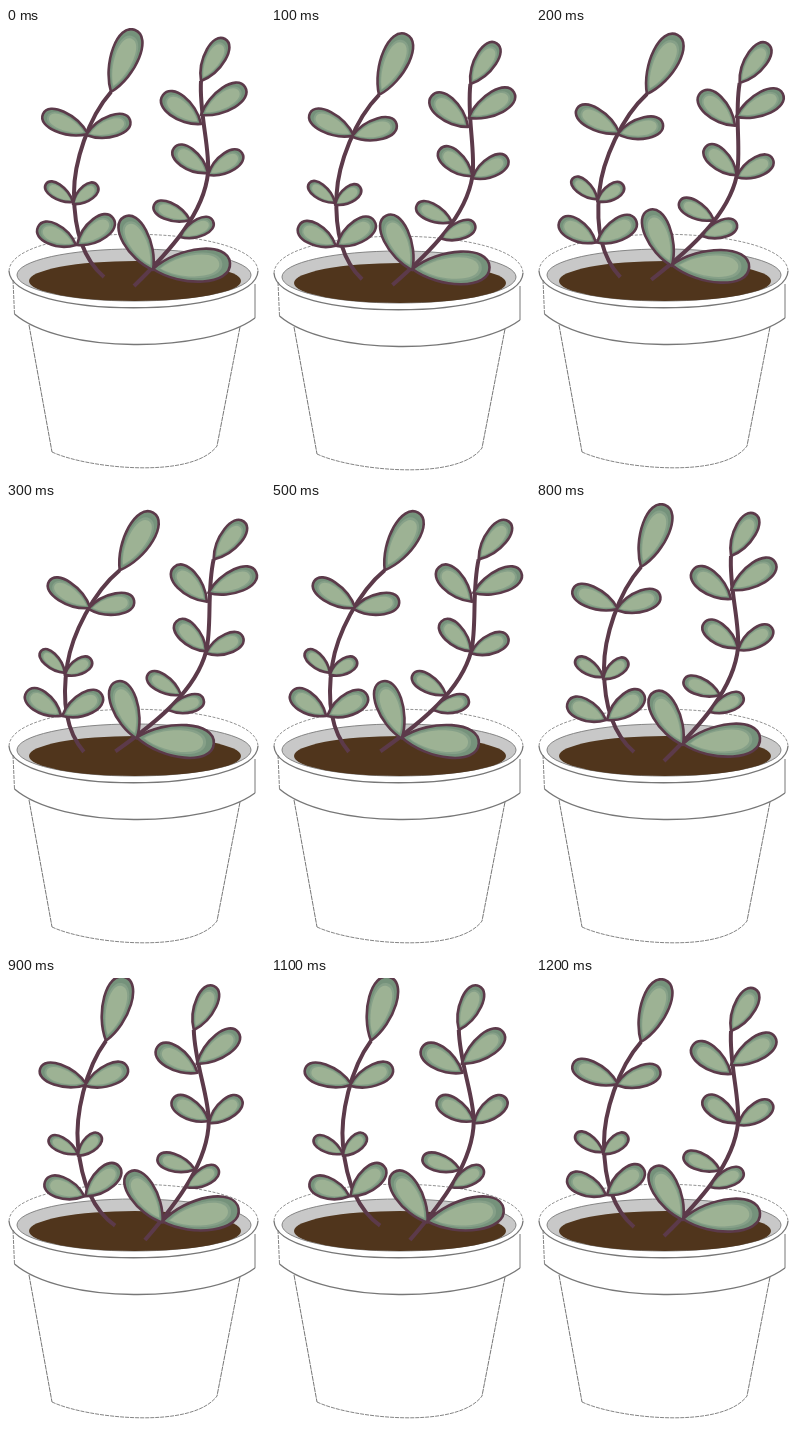
An HTML page with a canvas that plays this animation: 259 px wide and 447 px high, repeating every 1.4 s.

```html
<!DOCTYPE html>
<html lang="en">
<head>
<meta charset="utf-8">
<title>Swaying plant</title>
<style>
html, body { margin: 0; width: 100%; height: 100%; overflow: hidden; background: #fff; }
canvas { display: block; }
</style>
</head>
<body>
<canvas width="259" height="447"></canvas>
<script>
const ctx = document.querySelector('canvas').getContext('2d');
const STEP = 100, LOOP = 1400;
const sway = [0, 3.1, 6.1, 9, 12, 9, 6.1, 3.1, 0, -5, -9.5, -5, 0, 0]; // degrees
const bob = { 1: 2, 7: -1 }; // vertical offset by step
const PLUM = '#5c3a4a', GREEN = '#75927b', MID = '#86a088', LIGHT = '#9db294';

// Leaves: base x, base y, tip x, tip y, width
const plants = [
  {
    pivot: [89, 121],
    stem: 'M105 64C82 90 68 135 68 165C68 205 78 232 98 249',
    leaves: [
      [105, 64, 129, 2, 29], [82, 106, 37, 86, 22], [80, 107, 124, 92, 22],
      [67, 174, 40, 156, 15], [67, 176, 91, 157, 16],
      [70, 217, 32, 199, 22], [71, 217, 107, 190, 23]
    ]
  },
  {
    pivot: [180, 135],
    stem: 'M195 53C193 85 204 120 202 145C198 185 165 222 128 258',
    leaves: [
      [195, 53, 219, 11, 22], [195, 87, 239, 59, 24], [195, 96, 157, 67, 24],
      [202, 145, 168, 120, 21], [202, 147, 236, 125, 20],
      [184, 192, 148, 177, 18], [174, 209, 207, 193, 18],
      [147, 242, 118, 189, 27], [147, 241, 224, 235, 34]
    ]
  }
];
const teardrop = new Path2D('M0 0C.35 -.62 1 -.66 1 0C1 .66 .35 .62 0 0Z');

function line(d, color, width, dash = []) {
  ctx.strokeStyle = color;
  ctx.lineWidth = width;
  ctx.setLineDash(dash);
  ctx.stroke(new Path2D(d));
}

function ellipse(x, y, rx, ry, fill) {
  ctx.beginPath();
  ctx.ellipse(x, y, rx, ry, 0, 0, 2 * Math.PI);
  ctx.fillStyle = fill;
  ctx.fill();
}

function drawLeaf([x, y, tx, ty, width]) {
  const length = Math.hypot(tx - x, ty - y);
  const blade = (start, l, w) => {
    const path = new Path2D();
    path.addPath(teardrop, new DOMMatrix([l * length, 0, 0, w * width, start * length, 0]));
    return path;
  };
  const fill = (color, path) => {
    ctx.fillStyle = color;
    ctx.fill(path);
  };
  ctx.save();
  ctx.translate(x, y);
  ctx.rotate(Math.atan2(ty - y, tx - x));
  const outline = blade(0, 1, 1);
  fill(GREEN, outline);
  fill(MID, blade(0.08, 0.82, 0.78));
  fill(LIGHT, blade(0.1, 0.76, 0.66));
  ctx.strokeStyle = PLUM;
  ctx.lineWidth = 2.6;
  ctx.stroke(outline);
  ctx.restore();
}

function drawPot() {
  const gray = '#777';
  line('M3 243C5 194 250 194 252 243', gray, 0.8, [3, 1.5]);
  line('M3 243C5 292 250 292 252 243', gray, 1.3);
  ellipse(128, 247, 117, 26, '#c8c8c8');
  line('M11 247A117 26 0 0 1 245 247A117 26 0 0 1 11 247', '#858585', 1);
  ellipse(129, 253, 106, 20, '#50351c');
  line('M7 252L8.5 286', gray, 0.9, [4, 1]);
  line('M249 256V290', gray, 1);
  line('M8.5 286C55 326 200 326 249 290', gray, 1.3);
  line('M23 297L46 424M234 299L211 418', gray, 1, [5, 0.7]);
  line('M46 424C80 440 186 452 211 418', gray, 0.9, [4, 1]);
}

function drawPlant({ pivot: [x, y], stem, leaves }, degrees) {
  ctx.save();
  ctx.translate(x, y);
  ctx.rotate(degrees * Math.PI / 180);
  ctx.translate(-x, -y);
  line(stem, PLUM, 4);
  leaves.forEach(drawLeaf);
  ctx.restore();
}

function draw() {
  const step = Math.floor(performance.now() % LOOP / STEP);
  ctx.setTransform(1, 0, 0, 1, 0, 0);
  ctx.fillStyle = '#fff';
  ctx.fillRect(0, 0, 259, 447);
  ctx.translate(0, bob[step] || 0);
  ctx.lineCap = 'butt';
  ctx.lineJoin = 'round';
  drawPot();
  for (const plant of plants) drawPlant(plant, sway[step]);
  requestAnimationFrame(draw);
}
draw();
</script>
</body>
</html>
```
